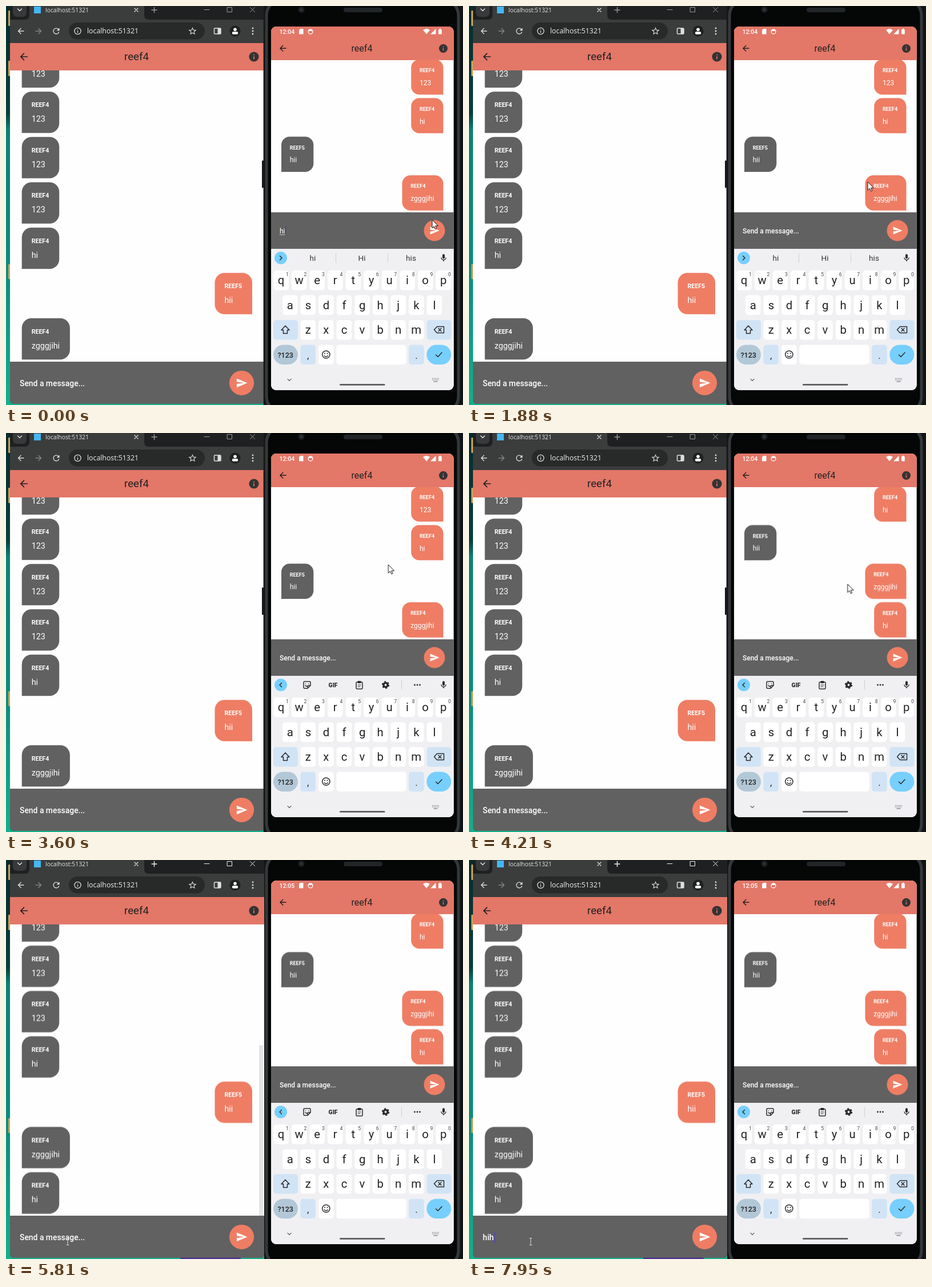
Write an HTML page that moves like this. It is 800 px wide and 700 px high and loops after 8000 ms.

```html
<!DOCTYPE html>
<html lang="en">
<head>
<meta charset="utf-8">
<title>Chat on two devices</title>
<style>
  html, body { margin: 0; width: 100%; height: 100%; overflow: hidden; background: #0b2a2a; }
  svg { display: block; width: 800px; height: 700px; font-family: Roboto, sans-serif; }
  .open { font-family: "Open Sans", "Noto Sans", sans-serif; }
  .mid { text-anchor: middle; }
  .line { fill: none; stroke-linecap: round; stroke-linejoin: round; }
</style>
</head>
<body>
<svg id="stage" viewBox="0 0 800 700" xmlns="http://www.w3.org/2000/svg"></svg>
<script>
const LOOP = 8000;
const GREY = '#616161', CORAL = '#ee7d64', BAR = '#e37768', INK = '#2b2b2e', SKY = '#76cffd';

const PATHS = {
  back: 'M20 11H7.83l5.59-5.59L12 4l-8 8 8 8 1.41-1.41L7.83 13H20z',
  send: 'M2 21 23 12 2 3v7l15 2-15 2z',
  info: 'M12 2a10 10 0 1 0 0 20 10 10 0 0 0 0-20zm1 15h-2v-6h2zm0-8h-2V7h2z',
  mic: 'M12 14c1.66 0 3-1.34 3-3V5a3 3 0 0 0-6 0v6c0 1.66 1.34 3 3 3zm5-3a5 5 0 0 1-10 0H5c0 3.53 2.61 6.43 6 6.92V21h2v-3.08c3.39-.49 6-3.39 6-6.92z',
  star: 'M22 9.24l-7.19-.62L12 2 9.19 8.63 2 9.24l5.46 4.73L5.82 21 12 17.27 18.18 21l-1.63-7.03zM12 15.4l-3.76 2.27 1-4.28-3.32-2.88 4.38-.38L12 6.1l1.71 4.04 4.38.38-3.32 2.88 1 4.28z',
  reload: 'M17.65 6.35A8 8 0 1 0 19.73 14h-2.08A6 6 0 1 1 12 6c1.66 0 3.14.69 4.22 1.78L13 11h7V4z'
};

// Drawing helpers
const rect = (x, y, w, h, fill, r = 0, more = '') =>
  `<rect x="${x}" y="${y}" width="${w}" height="${h}" rx="${r}" fill="${fill}" ${more}/>`;
const circle = (x, y, r, fill, more = '') => `<circle cx="${x}" cy="${y}" r="${r}" fill="${fill}" ${more}/>`;
const text = (x, y, size, str, fill = '#fff', cls = '', weight = 400) =>
  `<text x="${x}" y="${y}" font-size="${size}" fill="${fill}" class="${cls}" font-weight="${weight}">${str}</text>`;
const line = (d, color, w = 1.4, more = '') =>
  `<path class="line" d="${d}" stroke="${color}" stroke-width="${w}" ${more}/>`;
const icon = (name, x, y, s, fill) =>
  `<path d="${PATHS[name]}" fill="${fill}" transform="translate(${x} ${y}) scale(${s}) translate(-12 -12)"/>`;
const group = (id, body) => `<g id="${id}">${body}</g>`;

// Speech bubble: the bottom corner on the sender's side is square
function bubble(d, y, own, name, msg) {
  const w = msg.length > 4 ? d.wide : d.narrow, x = own ? d.right - w : d.left, r = d.r, h = d.h;
  const bl = own ? r : 0, br = own ? 0 : r;
  const shape = `M${x + r} ${y}h${w - 2 * r}a${r} ${r} 0 0 1 ${r} ${r}v${h - r - br}a${br} ${br} 0 0 1 ${-br} ${br}` +
    `h${-(w - bl - br)}a${bl} ${bl} 0 0 1 ${-bl} ${-bl}v${-(h - r - bl)}a${r} ${r} 0 0 1 ${r} ${-r}z`;
  return `<path d="${shape}" fill="${own ? CORAL : GREY}"/>` +
    text(x + d.pad, y + d.nameY, d.nameSize, name, '#fff', '', 700) +
    text(x + d.pad, y + d.msgY, d.msgSize, msg);
}

const WEB = { left: 27.7, right: 431, narrow: 65.5, wide: 84.2, r: 17, h: 72.5, pad: 17,
  nameY: 26.8, msgY: 52.8, nameSize: 10.6, msgSize: 14.3, top: 70.8, step: 79.5 };
const PHONE = { left: 482, right: 765.5, narrow: 56.3, wide: 72, r: 14.5, h: 61.8, pad: 14.7,
  nameY: 22.4, msgY: 45, nameSize: 9.1, msgSize: 12, top: 93.8, step: 67.7 };

const list = (d, me, msgs) => msgs.map((m, i) => {
  const name = m === 'hii' ? 'REEF5' : 'REEF4';
  return bubble(d, d.top + i * d.step, name === me, name, m);
}).join('');

function wallpaper() {
  const folders = [[8, 27], [96, 27], [453, 26]].map(([y, h]) => rect(4, y, 5, h, '#c9a25a', 1)).join('');
  return `<defs>
    <linearGradient id="wall" x2="0" y2="1"><stop offset="0" stop-color="#062c2c"/><stop offset=".27" stop-color="#07403c"/>
      <stop offset=".31" stop-color="#0b8274"/><stop offset=".68" stop-color="#0a8f7c"/><stop offset="1" stop-color="#12b08c"/></linearGradient>
    <clipPath id="webClip"><rect x="7" y="113" width="445" height="511"/></clipPath>
    <clipPath id="phoneClip"><rect x="464" y="95" width="320" height="267"/></clipPath>
    <clipPath id="screen"><rect x="464" y="36" width="319.7" height="638" rx="9"/></clipPath></defs>` +
    rect(0, 0, 800, 700, 'url(#wall)') + folders;
}

const controls = c => line('M347 6.5h9', c, 1) + line('M387.5 2.5h8v8h-8z', c, 1) +
  line('M427.5 2.5l8 8m0-8l-8 8', c, 1) + line('M255 7h9m-4.5-4.5v9', c, 1.4);

function browser() {
  const c = '#dedede';
  const chrome = rect(7, -10, 445, 708, '#1f2021', 7) +
    rect(12, -6, 24, 25, '#38393a', 7) + line('M20.5 5l3.5 3.5L27.5 5', c, 1.5) +
    `<path d="M33 24q8 0 8-8V-5H242V16q0 8 8 8z" fill="#3b3c3c"/>` + rect(7, 24, 445, 41, '#3b3c3c') +
    rect(49, 1, 12, 12, '#45b7f2') + text(69, 11, 10.4, 'localhost:51321', '#e6e6e6', 'open') +
    line('M225 4l6 6m0-6l-6 6', c, 1.3) +
    icon('back', 26, 44, .68, c) + `<g transform="rotate(180 57 44)">${icon('back', 57, 44, .68, '#858686')}</g>` +
    icon('reload', 88, 44, .7, c) + rect(110, 29, 238, 29.5, '#282929', 14.7) +
    circle(125.5, 44, 5.6, 'none', `stroke="${c}" stroke-width="1.3"`) + line('M125.5 43.6v3M125.5 41.3v.1', c, 1.3) +
    text(142, 48, 12.3, 'localhost:51321', '#f0f0f0', 'open') +
    icon('star', 326.5, 44, .7, c) +
    rect(364.5, 39, 11.5, 10, 'none', 1.5, `stroke="${c}" stroke-width="1.5"`) + rect(370.5, 39, 5.5, 10, c) +
    circle(401, 44, 9.5, '#1f2020') + circle(401, 41.2, 2.8, '#fff') + rect(395.8, 45, 10.4, 4.8, '#fff', 2.2) +
    [39, 44, 49].map(y => circle(432, y, 1.4, c)).join('') +
    group('idle', controls('#9a9a9a')) + group('focused', controls('#f2f2f2'));
  const app = rect(7, 65, 445, 48, BAR) + icon('back', 31.3, 89, .84, '#222') +
    text(228.5, 95, 18.7, 'reef4', '#222', 'mid') + icon('info', 434, 89, .86, '#333') +
    rect(7, 113, 445, 511, '#fefefe') +
    `<g clip-path="url(#webClip)">` +
    group('webList', list(WEB, 'REEF5', ['123', '123', '123', '123', 'hi', 'hii', 'zgggjihi', 'hi'])) +
    group('scroll', rect(443, 325, 7, 299, '#e4e4e4')) + '</g>' +
    `<path d="M7 624H452V691q0 7-7 7H14q-7 0-7-7z" fill="${GREY}"/>` +
    circle(412.5, 661.3, 21.6, CORAL) + icon('send', 412.7, 661.3, .88, '#fff') +
    group('webHint', text(24, 667, 13.9, 'Send a message...', '#fff', '', 500)) +
    ['h', 'hi', 'hih'].map((s, i) => group('typed' + i, text(24, 667, 14.2, s, '#fff', '', 500))).join('') +
    group('webCaret', rect(24, 652, 1.6, 20, '#5148a8'));
  return chrome + app + group('glow', rect(305, 697.8, 106, 2.2, '#4a2f96', 1));
}

function keyboard() {
  const row = (letters, x0, y) => [...letters].map((ch, i) => {
    const x = x0 + i * 31.57;
    return rect(x - 13.3, y, 26.6, 34.5, '#fff', 5) + text(x, y + 24, 20.3, ch, '#222', 'mid');
  }).join('');
  const nums = [...'1234567890'].map((n, i) => text(492.3 + i * 31.57, 473.5, 8.6, n, '#444', 'mid')).join('');
  const tone = '#d1e4f5';
  const words = [[537, 'hi'], [623, 'Hi'], [709, 'his']].map(([x, s]) => text(x, 447, 13.6, s, '#333', 'mid')).join('');
  const tools = line('M533 443v-5.5q0-1.5-1.5-1.5h-9q-1.5 0-1.5 1.5v9q0 1.5 1.5 1.5h5.5zM533 443h-3.5q-1.5 0-1.5 1.5v3.5M524.5 440v.1M529.5 440v.1M524 443q1.5 1.8 3 1', INK, 1.5) +
    text(572.5, 446, 10.3, 'GIF', INK, 'mid', 900) +
    rect(613, 437, 11, 12, 'none', 1.5, `stroke="${INK}" stroke-width="1.5"`) + rect(615.5, 435, 6, 4, INK, 1) +
    line('M616 442h5M616 445h4', INK, 1.1) +
    circle(664.5, 442, 3.6, 'none', `stroke="${INK}" stroke-width="3.4"`) +
    circle(664.5, 442, 5.7, 'none', `stroke="${INK}" stroke-width="2" stroke-dasharray="2.98 2.98"`) +
    line('M692.5 434v16', '#cfcfd3', 1) + [715.5, 720, 724.5].map(x => circle(x, 442, 1.4, INK)).join('');
  return rect(464, 426, 320, 248, '#f0f0f3') + circle(481, 442, 11, SKY) +
    group('words', words + line('M577.5 434v16M668.5 434v16', '#cfcfd3', 1) + line('M479.5 438.5l3.5 3.5-3.5 3.5', INK, 1.5)) +
    group('tools', tools + line('M482.5 438.5l-3.5 3.5 3.5 3.5', INK, 1.5)) +
    icon('mic', 766, 442, .68, INK) +
    row('qwertyuiop', 481.6, 464) + nums + row('asdfghjkl', 497.3, 507.5) + row('zxcvbnm', 528.8, 551) +
    rect(468, 551, 43, 34.5, tone, 5) + line('M489 561l7 7.5h-3.5v6h-7v-6H482z', INK, 1.5) +
    rect(736.5, 551, 43, 34.5, tone, 5) + line('M754.5 562.5h12v11h-12l-5-5.5zM757 565.5l5 5m0-5l-5 5', INK, 1.5) +
    rect(468, 594.5, 43, 34.5, '#b2c8d7', 17.2) + text(489.2, 616.5, 12.6, '?123', '#222', 'mid', 500) +
    rect(515.3, 594.5, 26.6, 34.5, tone, 5) + text(528.6, 619, 17, ',', '#222', 'mid') +
    rect(547, 594.5, 26.6, 34.5, '#fff', 5) + circle(560.3, 611.5, 6.6, 'none', `stroke="${INK}" stroke-width="1.5"`) +
    circle(558, 609.5, 1.1, INK) + circle(562.6, 609.5, 1.1, INK) + line('M557 613.5q3.3 3.6 6.6 0', INK, 1.4) +
    rect(578.3, 594.5, 122.3, 34.5, '#fff', 5) +
    rect(705, 594.5, 26.8, 34.5, tone, 5) + text(718.4, 619, 17, '.', '#222', 'mid') +
    rect(736.3, 594.5, 43, 34.5, SKY, 17.2) + line('M752.5 612l3.5 3.5 7-7.5', INK, 1.5) +
    line('M493 654.5l3 3 3-3', '#666', 1.2) + rect(584, 663, 79.5, 2.8, '#5c5c5e', 1.4) +
    line('M746.5 653.5h11M746.5 656h11', '#777', 1.3, 'stroke-dasharray=".2 2.4"') + line('M749 658.8h6', '#777', 1.3);
}

function statusIcons(x) {
  return `<path d="M${x - 2} 40h5.5v9.5h-7.5V42.3z" fill="#fff"/>` +
    circle(x + 16, 45, 4, 'none', 'stroke="#fff" stroke-width="1.3"') + rect(x + 12.5, 41.8, 7, 2.2, '#fff');
}

function phone() {
  const frame = group('edge', rect(450.6, 0, 3, 700, '#1a1c1d') + rect(448, 271, 3, 48, '#161819', 1)) +
    rect(452, -20, 350, 740, '#111415') +
    rect(453.5, -14, 341, 730, '#34383b', 30) + rect(458.5, -9, 331, 720, '#050606', 26) +
    circle(517, 6.5, 5.5, '#1c1e20') + circle(517, 6.5, 2.3, '#303840') + rect(591, 3, 68, 8, '#222528', 4);
  const status = group('clock4', text(478.5, 49, 10.6, '12:04', '#fff', '', 500)) +
    group('clock5', text(478.5, 49, 10.6, '12:05', '#fff', '', 500)) +
    group('icons', statusIcons(517)) +
    group('iconsMore', line('M517 41v1M517 44.5v4M515 48.5h4', '#f6cfc8', 1) + statusIcons(533)) +
    `<path d="M730 42.2q6-4.6 12 0L736 49.4zM752.5 40v9.4h-9.4z" fill="#fff"/>` +
    rect(757, 41, 5.8, 8.6, '#fff', 1) + rect(758.6, 39.8, 2.6, 2, '#fff');
  return frame + '<g clip-path="url(#screen)">' + rect(464, 36, 320, 640, '#fefefe') +
    '<g clip-path="url(#phoneClip)">' +
    group('phoneList', list(PHONE, 'REEF4', ['123', 'hi', 'hii', 'zgggjihi', 'hi'])) + '</g>' +
    rect(464, 36, 320, 59, BAR) + status +
    icon('back', 484.7, 74.3, .72, '#222') + text(623, 80, 16, 'reef4', '#222', 'mid') + icon('info', 765.5, 74.5, .75, '#333') +
    rect(464, 362, 320, 64, GREY) + circle(750, 394, 18.5, CORAL) + icon('send', 750.2, 394, .76, '#fff') +
    group('draft', text(479, 399, 12, 'hi') + line('M479 401.3h10', '#ddd', .9)) +
    group('draftCaret', rect(489.2, 386, 1, 18, '#463f88')) +
    group('phoneHint', text(479, 399, 12, 'Send a message...', '#fff', '', 500)) +
    group('phoneCaret', rect(478.6, 385.5, 1.4, 18, '#463f88')) + keyboard() + '</g>';
}

const pointer = group('pointer',
  group('arrow', '<path d="M0 0V14.6l3.4-3.1 2.2 5 2.2-1-2.1-4.8h4.7z" fill="#fff" stroke="#111" stroke-width="1"/>') +
  group('beam', line('M-2 -5.5h4M-2 6.5h4M0 -5.5v12', '#d8d8d8', 1)));

document.getElementById('stage').innerHTML = wallpaper() + browser() + phone() + pointer;

// Animation: every track becomes one CSS keyframes rule
const rules = [];
const pct = t => (t / LOOP * 100).toFixed(3) + '%';
function track(id, frames, timing) {
  const body = frames.map(([t, css]) => `${pct(t)}{${css}}`).join('');
  rules.push(`@keyframes ${id}{${body}}#${id}{animation:${id} ${LOOP}ms ${timing} infinite}`);
}
// Visible only inside the given [from, to] spans
function show(id, ...spans) {
  const frames = spans[0][0] > 0 ? [[0, 'opacity:0']] : [];
  for (const [from, to] of spans) {
    frames.push([from, 'opacity:1']);
    if (to < LOOP) frames.push([to, 'opacity:0']);
  }
  track(id, frames, 'step-end');
}
const jump = (id, at, dy) =>
  track(id, [[0, 'transform:none'], [at, `transform:translateY(${dy}px)`]], 'step-end');

show('draft', [0, 1065]);
show('draftCaret', [0, 270]);
show('phoneHint', [1065, LOOP]);
show('phoneCaret', [1065, 1475], [2010, 2505], [3120, 3480], [5130, 5600], [6120, 6605], [7145, 7545]);
show('words', [0, 3380]);
show('tools', [3380, LOOP]);
jump('phoneList', 3750, -PHONE.step);
show('clock4', [0, 4570]);
show('clock5', [4570, LOOP]);
show('icons', [0, 4570], [5400, LOOP]);
show('iconsMore', [4570, 5400]);

jump('webList', 4985, -WEB.step);
track('scroll', [[0, 'opacity:0;transform:translateY(-45px)'], [4800, 'opacity:0;transform:translateY(-45px)'],
  [4850, 'opacity:.8;transform:translateY(-45px)'], [4980, 'opacity:1;transform:translateY(-45px)'],
  [4985, 'opacity:1;transform:none'], [5800, 'opacity:1;transform:none'],
  [6200, 'opacity:0;transform:none'], [LOOP, 'opacity:0;transform:none']], 'linear');
show('idle', [0, 5805]);
show('edge', [0, 5805]);
show('focused', [5805, LOOP]);
show('glow', [5805, LOOP]);
show('webHint', [0, 7145]);
show('typed0', [7145, 7475]);
show('typed1', [7475, 7945]);
show('typed2', [7945, LOOP]);
track('webCaret', [[0, 'opacity:0'], [5940, 'opacity:1'], [6455, 'opacity:0'], [6945, 'opacity:1'],
  [7145, 'opacity:1;transform:translateX(8.2px)'], [7475, 'opacity:1;transform:translateX(12px)'],
  [7945, 'opacity:1;transform:translateX(20px)']], 'step-end');

show('arrow', [0, 5560]);
show('beam', [5560, LOOP]);
track('pointer', [[0, 746, 375], [70, 746, 376], [410, 744.5, 388], [1700, 744.5, 388], [1880, 698, 308.5],
  [2100, 694, 316], [2510, 688, 331], [2780, 688, 331], [3060, 690, 334.5], [3340, 676, 214], [3530, 670, 226],
  [3900, 666, 252], [4210, 663, 265], [4300, 640, 272], [4400, 588, 295], [4710, 284, 473.5], [5080, 284, 473.5],
  [5560, 140, 650], [5740, 108, 669], [LOOP, 108, 669]
].map(([t, x, y]) => [t, `transform:translate(${x}px,${y}px)`]), 'linear');

document.head.appendChild(document.createElement('style')).textContent = rules.join('\n');
</script>
</body>
</html>
```
